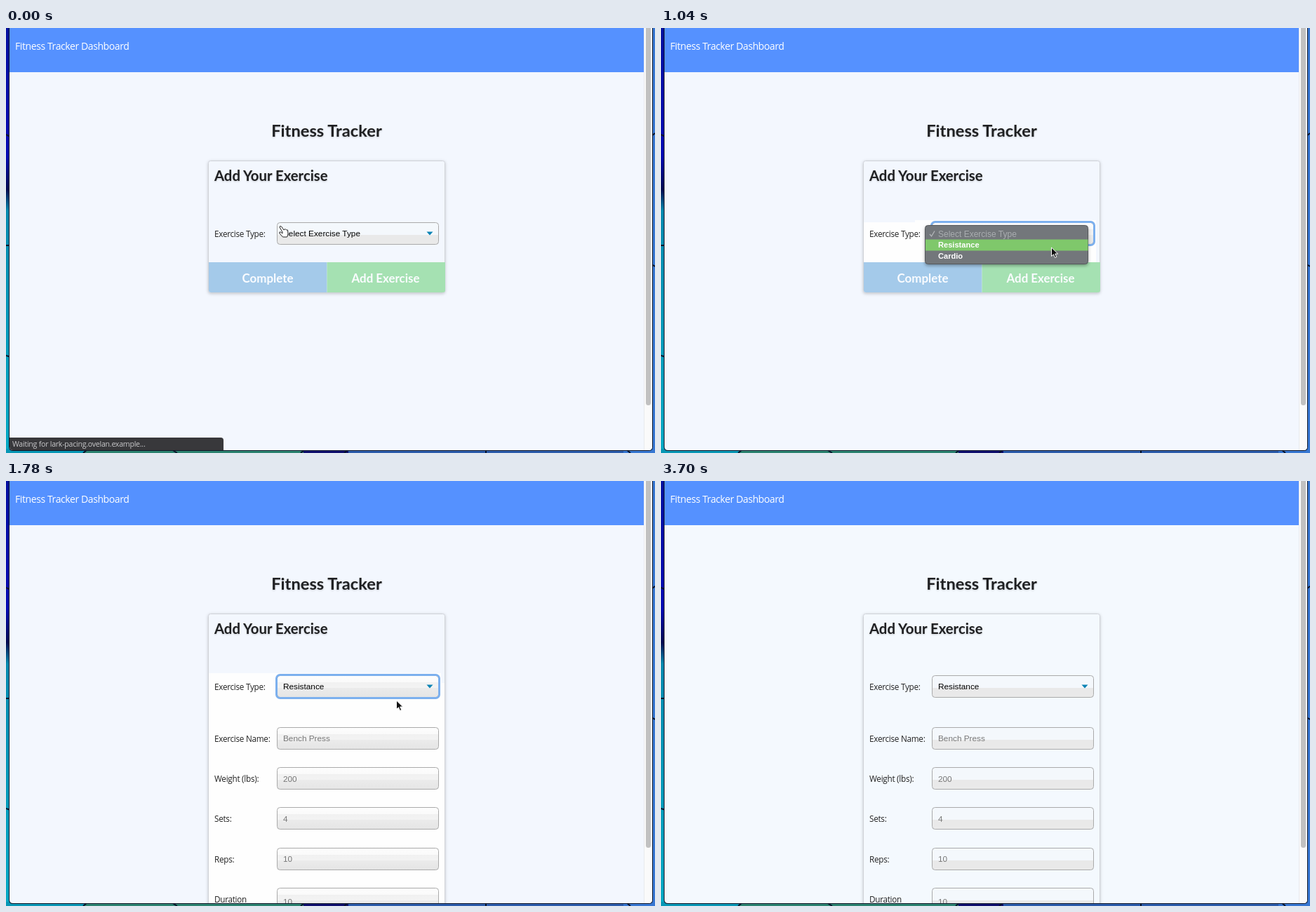
An HTML page for the animation above (3.8 s loop, 925 px wide and 606 px high).

```html
<!DOCTYPE html>
<html lang="en">
<head>
<meta charset="utf-8">
<title>Fitness Tracker</title>
<style>
  html, body { margin: 0; width: 100%; height: 100%; overflow: hidden; }
  svg { display: block; width: 925px; height: 606px; }
  .lato { font-family: Lato, sans-serif; font-weight: 700; }
  .label { font: 11.7px "Open Sans", sans-serif; letter-spacing: -.25px; fill: #222; }
  .field { font: 11.8px "Liberation Sans", Arial, sans-serif; }
  .item { font: 700 11.1px "Liberation Sans", Arial, sans-serif; fill: #fff; }
  .hint { fill: #777; }
  .title { fill: #1f2022; filter: drop-shadow(0 1px 1px #0003); }
  #card { filter: drop-shadow(0 1px 2px #0003); }
  #popup { filter: drop-shadow(0 2px 2px #0005); }
</style>
</head>
<body>
<svg viewBox="0 0 925 606">
  <defs>
    <linearGradient id="glossy" x2="0" y2="1">
      <stop offset="0" stop-color="#fdfdfd"/><stop offset=".32" stop-color="#fafafa"/>
      <stop offset=".32" stop-color="#f1f1f1"/><stop offset=".58" stop-color="#f3f3f3"/>
      <stop offset=".58" stop-color="#ebebeb"/><stop offset="1" stop-color="#e5e5e5"/>
    </linearGradient>
    <linearGradient id="flat" x2="0" y2="1">
      <stop offset=".58" stop-color="#f4f8fc"/><stop offset=".58" stop-color="#e9e9e9"/>
    </linearGradient>
    <linearGradient id="edge" x2="0" y2="1">
      <stop offset="0" stop-color="#0510a0"/><stop offset=".3" stop-color="#0208b4"/>
      <stop offset=".38" stop-color="#020a50"/><stop offset=".43" stop-color="#0389ae"/>
      <stop offset="1" stop-color="#05a9c4"/>
    </linearGradient>
    <clipPath id="win"><path d="M5 0H921V597Q921 602 916 602H10Q5 602 5 597Z"/></clipPath>
  </defs>

  <!-- desktop behind the window -->
  <path fill="#3777d2" d="M0 0H925V606H0Z"/>
  <path fill="url(#edge)" d="M0 0H12V606H0Z"/>
  <path fill="#0797b5" d="M0 600H112V606H0Z"/>
  <path fill="#2c8370" d="M112 600H424V606H112Z"/>
  <path fill="#10106e" d="M424 600H488V606H424Z"/>
  <path fill="#2c5cab" d="M488 600H880V606H488Z"/>
  <path stroke="#07132b" stroke-width="2" d="M0 152l6 3M0 310H6M0 467l6 2M110 606l6-5M236 601l8 5M420 606l6-5M488 601l-6 5M684 601v5M884 601l6 5M920 337l5 3M920 154l5-4"/>
  <path fill="#10182a" d="M4 0H922V597Q922 603 916 603H10Q4 603 4 597Z"/>

  <g clip-path="url(#win)">
    <path id="page" d="M5 0H921V602H5Z"/>
    <path fill="#5591ff" d="M5 0H909V63H5Z"/>
    <text x="13" y="31" fill="#fff" style="font:14px 'Open Sans',sans-serif;letter-spacing:-.4px">Fitness Tracker Dashboard</text>
    <path fill="#fafafa" d="M909 0H921V602H909Z"/>
    <path fill="#e8eaed" d="M909 0H910V602H909Z"/>
    <rect id="thumb" x="912" y="-10" width="7" rx="3.5" fill="#c1c1c1"/>
    <text class="lato title" x="457" y="154.5" font-size="23.7" text-anchor="middle">Fitness Tracker</text>

    <rect id="card" x="288.5" y="189.5" width="337" rx="3" stroke="#d0d3d8"/>
    <path id="white" fill="#fefefe"/>
    <text class="lato title" x="297" y="217.5" font-size="20.3">Add Your Exercise</text>
    <g id="buttons" class="lato" font-size="16.9" text-anchor="middle">
      <path fill="#a4caea" d="M289 334H457.5V377H292Q289 377 289 374Z"/>
      <path fill="#a5e1b2" d="M457.5 334H626V374Q626 377 623 377H457.5Z"/>
      <text x="373" y="362.5" fill="#fafcff">Complete</text>
      <text x="541" y="362.5" fill="#fafcff">Add Exercise</text>
    </g>
    <g id="rows"></g>
    <rect id="ring" x="385.5" y="276.5" width="232" height="33" rx="5" fill="none" stroke="#7cb0ee" stroke-width="3"/>

    <g id="popup">
      <rect x="376.5" y="281.5" width="232" height="55" rx="4" fill="#73777b" stroke="#55585b"/>
      <path id="pick" fill="#7fc86b" d="M377 301.5H608.5V317.5H377Z"/>
      <text class="field" x="395" y="297.5" style="font-size:12px" fill="#a9adb0">Select Exercise Type</text>
      <path fill="none" stroke="#b4b7ba" stroke-width="1.3" d="M383 294l2.5 3 4.5-7.5"/>
      <text class="item" x="395" y="313">Resistance</text>
      <text class="item" x="395" y="329">Cardio</text>
    </g>

    <g id="status">
      <path fill="#38383b" d="M5 584H306Q310 584 310 588V602H5Z"/>
      <text x="9" y="597" fill="#c9c9cb" style="font:10.6px 'Open Sans',sans-serif;letter-spacing:-.25px">Waiting for lark-pacing.ovelan.example...</text>
    </g>
    <path id="arrow" fill="#111" stroke="#fff" d="M0 0V12.5L3 9.8 5 14.5 7.3 13.5 5.2 9H9.2Z"/>
    <path id="hand" fill="#fff" stroke="#222" stroke-linejoin="round" d="M394 291L390 284Q390 281.500 392.500 283L396 288 398 286.500 399.500 288 401.500 288 402 293Q402 296 400.500 298H394.500L390 293Q389 290 391.500 291L394 293Z"/>
  </g>
</svg>
<script>
const el = id => document.getElementById(id);
const show = (id, on) => el(id).style.display = on ? "" : "none";

// label, hint, top of the box, baseline of the hint below that top
const rows = [
  ["Exercise Type:", "", 277, 20],
  ["Exercise Name:", "Bench Press", 351, 20],
  ["Weight (lbs):", "200", 408, 20.5],
  ["Sets:", "4", 465, 20.5],
  ["Reps:", "10", 523, 20],
  ["Duration", "10", 580, 24]
];
el("rows").innerHTML = rows.map(([label, hint, y, base], i) => `
  <g class="${i ? "extra" : ""}">
    <text class="label" x="297" y="${y + 21}">${label}</text>
    <rect class="box" x="386.5" y="${y + .5}" width="230" height="31" rx="4" stroke="#aaa"/>
    <text class="field ${i ? "hint" : "choice"}" x="395" y="${y + base}">${hint}</text>
    ${i ? "" : '<path fill="#0b83b4" d="M599.500 290.500H608.500L604 295.500Z"/>'}
  </g>`).join("");

const boxes = document.querySelectorAll(".box");
const extras = document.querySelectorAll(".extra");
const choice = document.querySelector(".choice");

// time, x, y of the pointer tip
const moves = [
  [300, 500, 300], [440, 575, 309], [590, 566, 300], [1040, 556, 313],
  [2230, 707, 349], [2380, 748, 366], [2520, 755, 371],
  [2670, 878, 568], [2820, 877, 588]
];

function draw(now) {
  const t = now % 3800;
  const between = (a, b) => t >= a && t < b;
  const fresh = t >= 3700, open = t >= 1780, flat = t < 300 || fresh;
  const bg = fresh ? "#f4f9fe" : "#f3f7fe";

  el("page").setAttribute("fill", bg);
  el("card").setAttribute("fill", bg);
  el("card").setAttribute("height", open ? 440 : 188);
  el("thumb").setAttribute("height", open ? 533 : 548);
  el("white").setAttribute("d", flat ? "" :
    open ? "M289 274H620V288H625V602H289Z" :
    t < 890 ? "M289 277H617V334H289Z" : "M289 277H362V274H620V334H289Z");

  boxes.forEach(b => b.setAttribute("fill", flat ? "url(#flat)" : "url(#glossy)"));
  boxes[0].setAttribute("stroke", between(590, 890) ? "#777" : "#aaa");
  extras.forEach(r => r.style.display = open ? "" : "none");
  choice.textContent = open ? "Resistance" : "Select Exercise Type";

  show("buttons", !open);
  show("ring", between(890, 3700));
  show("popup", between(890, 1630));
  show("pick", between(1040, 1330) || between(1480, 1630));
  show("status", t < 440);
  el("status").style.opacity = t < 300 ? 1 : .5;

  show("hand", t < 300);
  show("arrow", between(300, 2970));
  const [, x, y] = moves.findLast(m => m[0] <= t) || moves[0];
  el("arrow").setAttribute("transform", `translate(${x + .5} ${y})`);
  requestAnimationFrame(draw);
}
draw(0);
</script>
</body>
</html>
```
